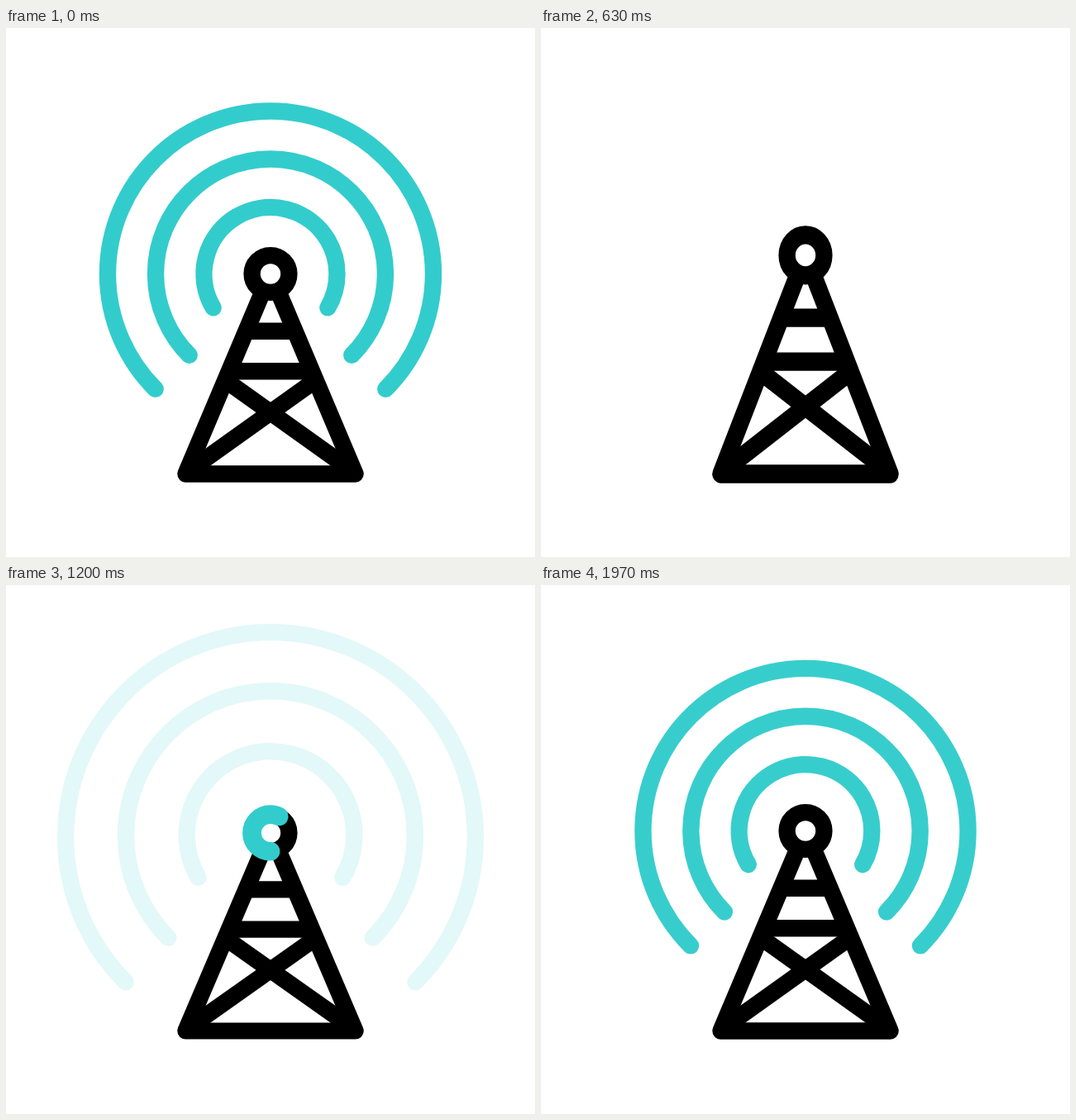
Animation, 640 px wide and 640 px high, one loop 2000 ms. Source, as an HTML page with a canvas:

```html
<!DOCTYPE html>
<html lang="en">
<head>
<meta charset="utf-8">
<title>Radio tower</title>
<style>
  html, body { margin: 0; width: 100%; height: 100%; overflow: hidden; background: #fff; }
  canvas { display: block; width: 100vmin; height: 100vmin; margin: 0 auto; }
</style>
</head>
<body>
<canvas id="stage" width="640" height="640"></canvas>
<script>
const ctx = document.getElementById('stage').getContext('2d');
const LOOP = 2000, STEPS = 60;
const TEAL = '#33cccc', CX = 320, CY = 297.5, BASE = 539.5;

// radius, opening angle below the horizontal, distance of the box centre above the arc centre
const RINGS = [
  { r: 197, open: 45, lift: 29 },
  { r: 139, open: 45, lift: 22 },
  { r: 80.5, open: 30.5, lift: 19 }
];

const clamp = v => Math.min(1, Math.max(0, v));
const ease = v => v * v * (3 - 2 * v);
const linear = v => v;
const rad = deg => deg * Math.PI / 180;

// Pulses: step of full strength, fade-in and fade-out lengths in steps
const PULSES = [
  { peak: 0, rise: 10, fall: 10, curve: ease },
  { peak: 26.7, rise: 4.5, fall: 10.8, curve: linear },
  { peak: 60, rise: 10, fall: 10, curve: ease }
];

// Vertical stretch of the tower: [step, scale]
const STRETCH = [[0, 1], [6, 0.95], [17.5, 1.1], [27, 1], [32, 0.95], [37.6, 1], [60, 1]];

function stretchAt(f) {
  const i = STRETCH.findIndex(key => key[0] > f);
  const [f0, a] = STRETCH[i - 1], [f1, b] = STRETCH[i];
  return a + (b - a) * ease((f - f0) / (f1 - f0));
}

function line(...pts) {
  ctx.beginPath();
  for (let i = 0; i < pts.length; i += 2) ctx.lineTo(pts[i], pts[i + 1]);
  ctx.stroke();
}

function arc(cy, r, from, to) {
  ctx.beginPath();
  ctx.arc(CX, cy, r, from, to);
  ctx.stroke();
}

function drawRings(scale, alpha) {
  ctx.save();
  ctx.globalAlpha = alpha;
  ctx.strokeStyle = TEAL;
  ctx.lineWidth = 20.4;
  ctx.lineCap = 'round';
  for (const { r, open, lift } of RINGS) {
    arc(CY + lift * (scale - 1), r * scale, rad(180 - open), rad(360 + open));
  }
  ctx.restore();
}

function drawPulse(f, { peak, rise, fall, curve }) {
  const d = f - peak;
  if (d <= -rise || d >= fall) return;
  if (d < 0) {
    const rest = curve(-d / rise);
    drawRings(1 - 0.08 * rest, 1 - rest);
  } else {
    drawRings(1 + 0.3 * d / fall, 1 - d / fall);
  }
}

function drawTower() {
  ctx.strokeStyle = '#000';
  ctx.lineWidth = 20.4;
  ctx.lineCap = 'butt';
  ctx.lineJoin = 'round';
  line(311, 318, 217.4, BASE, 422.6, BASE, 329, 318);
  line(291, 366.7, 349, 366.7);
  line(270, 415.3, 370, 415.3);
  line(268, 428, 420, 536.5);
  line(372, 428, 220, 536.5);
  arc(CY, 22.4, 0, 2 * Math.PI);
}

// The coloured line runs clockwise round the head from its lowest point
function drawCharge(f) {
  const end = ease(clamp((f - 30.5) / 10));
  const start = ease(clamp((f - 40.3) / 10));
  if (end <= start) return;
  ctx.strokeStyle = TEAL;
  ctx.lineWidth = 22.8;
  ctx.lineCap = 'round';
  arc(CY, 22.5, rad(90 + 360 * start), rad(90 + 360 * end));
}

function draw(f) {
  ctx.fillStyle = '#fff';
  ctx.fillRect(0, 0, 640, 640);
  PULSES.forEach(p => drawPulse(f, p));
  ctx.save();
  ctx.translate(0, BASE);
  ctx.scale(1, stretchAt(f));
  ctx.translate(0, -BASE);
  drawTower();
  drawCharge(f);
  ctx.restore();
}

const begin = performance.now();
function tick() {
  const t = Math.max(0, performance.now() - begin);
  draw(Math.floor((t + 4) * STEPS / LOOP) % STEPS);
  requestAnimationFrame(tick);
}
tick();
</script>
</body>
</html>
```
